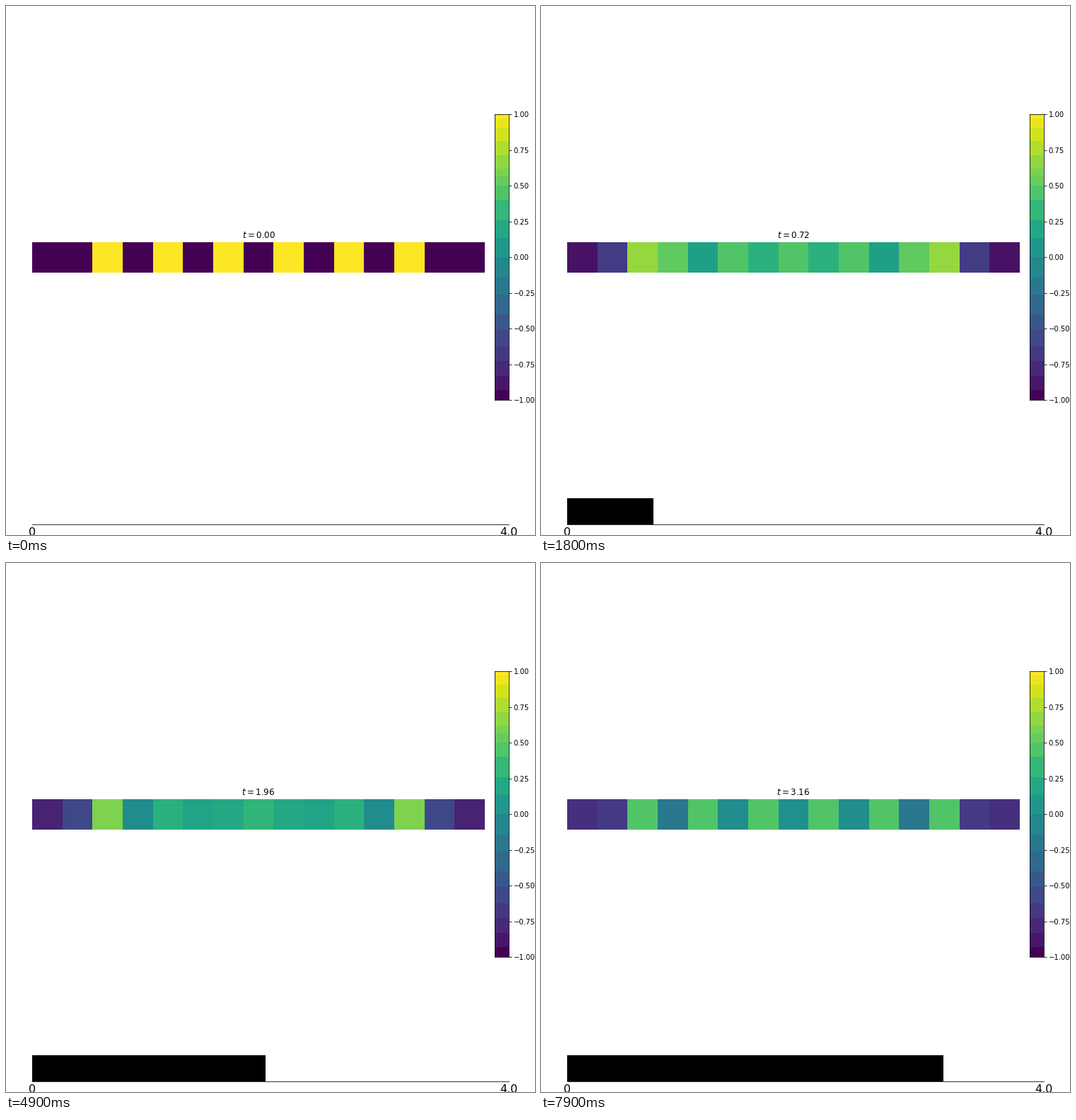
These frames come from a looping animation (748x748 px, 8000 ms). A matplotlib script:

```python
import numpy as np
import matplotlib.pyplot as plt
from matplotlib.animation import FuncAnimation
from matplotlib.patches import Rectangle

SIZE, DPI = 748, 72
FRAMES, DT, T_MAX = 80, 0.04, 4.0
LEFT, BAR_W, BAR_Y, BAR_H = 37.4, 673.2, 733.04, 37.4
STRIP = (37.4, 677.0, 376.6, 334.0)

# Left half of the mirror-symmetric chain, sampled at a few times
TIMES = np.array([0, 0.28, 0.72, 1.12, 1.56, 2.36, 3.16])
STATES = np.array([
    [-1.00, -1.00, 1.00, -1.00, 1.00, -1.00, 1.00, -1.00],
    [-0.91, -0.68, 0.65, 0.54, -0.57, 0.76, -0.68, 0.76],
    [-0.90, -0.65, 0.68, 0.51, 0.14, 0.46, 0.28, 0.46],
    [-0.90, -0.73, 0.68, -0.21, 0.63, -0.10, 0.68, -0.21],
    [-0.83, -0.55, 0.68, -0.20, 0.54, -0.08, 0.46, 0.04],
    [-0.79, -0.61, 0.53, 0.14, 0.06, 0.40, 0.06, 0.47],
    [-0.73, -0.66, 0.46, -0.20, 0.46, -0.02, 0.46, 0.00],
])


def slopes(t, y):
    """Shape-preserving slopes, flat at turning points and at the start."""
    d = np.diff(y, axis=0) / np.diff(t)[:, None]
    a, b = d[:-1], d[1:]
    same = a * b > 0
    m = np.zeros_like(y)
    m[1:-1] = np.where(same, 2 * a * b / np.where(same, a + b, 1), 0)
    return m


SLOPES = slopes(TIMES, STATES)


def chain(t):
    """Cubic Hermite value of all 15 cells at time t."""
    k = min(np.searchsorted(TIMES, t, side="right") - 1, len(TIMES) - 2)
    h = TIMES[k + 1] - TIMES[k]
    s = (t - TIMES[k]) / h
    half = ((1 + 2 * s) * (1 - s) ** 2 * STATES[k]
            + s * (1 - s) ** 2 * h * SLOPES[k]
            + s * s * (3 - 2 * s) * STATES[k + 1]
            + s * s * (s - 1) * h * SLOPES[k + 1])
    return np.concatenate([half, half[-2::-1]])


fig = plt.figure(figsize=(SIZE / DPI, SIZE / DPI), dpi=DPI, facecolor="white")
plt.rcParams["font.family"] = "DejaVu Sans"

# Stage in pixel coordinates, y pointing down
ax = fig.add_axes([0, 0, 1, 1])
ax.axis("off")
strip = ax.imshow(chain(0)[None, :], cmap="viridis", vmin=-1, vmax=1,
                  extent=STRIP, interpolation="nearest", aspect="auto")
ax.set(xlim=(0, SIZE), ylim=(SIZE, 0))
title = ax.text(sum(STRIP[:2]) / 2, STRIP[3] - 6, "", fontsize=12,
                ha="center", va="baseline")

# Progress bar
bar = ax.add_patch(Rectangle((LEFT, BAR_Y - BAR_H), 0, BAR_H, fc="black", lw=0))
ax.plot([LEFT, LEFT + BAR_W], [BAR_Y, BAR_Y], color="black", lw=0.8)
for x, label in ((LEFT, "0"), (LEFT + BAR_W, "4.0")):
    ax.text(x, 748.6, label, fontsize=16, ha="center", va="baseline")

# Stepped colour scale
cax = fig.add_axes([690.6 / SIZE, 1 - 557.26 / SIZE, 20.2 / SIZE, 403.92 / SIZE])
edges = np.array([-1, -0.93, -0.83, -0.727, -0.623, -0.51, -0.4, -0.26, -0.142,
                  0, 0.135, 0.26, 0.403, 0.5, 0.566, 0.62, 0.714, 0.814,
                  0.908, 0.972, 1])
mids = (edges[:-1] + edges[1:]) / 2
mids[0], mids[-1] = -1, 1
cax.pcolormesh([0, 1], edges, mids[:, None], cmap="viridis", vmin=-1, vmax=1)
cax.set(xlim=(0, 1), ylim=(-1, 1), xticks=[], yticks=np.linspace(-1, 1, 9))
cax.yaxis.tick_right()
cax.yaxis.set_major_formatter("{x:.2f}")
cax.set_yticklabels([f"{v:.2f}".replace("-", "\u2212")
                     for v in np.linspace(-1, 1, 9)])
cax.tick_params(labelsize=10, length=3.5, width=0.8, pad=3.5)


def update(i):
    t = i * DT
    strip.set_data(chain(t)[None, :])
    title.set_text(f"$t = {t:.2f}$")
    bar.set_width(BAR_W * t / T_MAX)
    bar.set_visible(i > 0)
    return strip, title, bar


anim = FuncAnimation(fig, update, frames=FRAMES, interval=100,
                     repeat=True, repeat_delay=0, blit=False)
plt.show()
```
